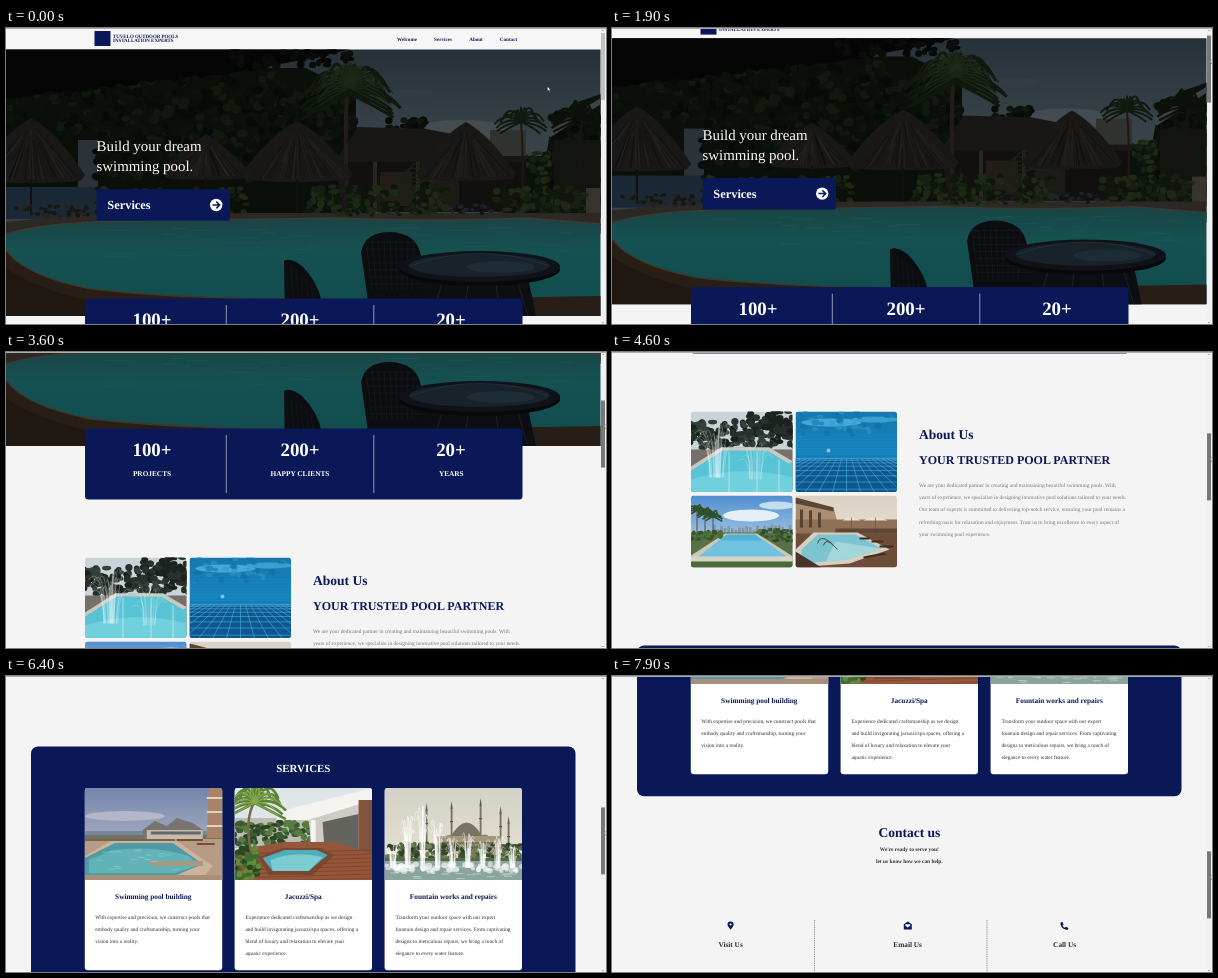
Recreate the animation shown at these times as an HTML page. Size 600 px wide and 296 px high, loop 8 s.

```html
<!DOCTYPE html>
<html lang="en">
<head>
<meta charset="utf-8">
<title>Swimming pools</title>
<style>
@property --s { syntax: '<number>'; inherits: true; initial-value: 0; }
html, body { margin: 0; width: 100%; height: 100%; overflow: hidden; background: #f4f4f4; }
#stage { position: relative; width: 600px; height: 296px; overflow: hidden; background: #f4f4f4; animation: scroll 8s infinite; }
#page { position: absolute; left: 0; top: 0; transform: translateY(calc(var(--s) * -1px)); }
text { font-family: 'Liberation Serif', 'Times New Roman', serif; text-rendering: geometricPrecision; }
.b { font-weight: bold; }
.m { text-anchor: middle; }
.navy { fill: #0a1858; }
.w { fill: #fff; }
.dark { fill: #2e2e33; }
.p { font-size: 5.41px; }
.h { font-size: 7.32px; }
#line { position: absolute; left: 0; top: 0; width: 600px; height: 1px; background: #adadad; }
#bar { position: absolute; left: 594.5px; top: 1px; width: 5.5px; height: 295px; background: #f1f1f1; }
#bar i { position: absolute; left: 1.5px; border: 1.5px solid transparent; }
#up { top: 0; border-bottom-color: #777 !important; }
#down { bottom: 0; border-top-color: #777 !important; }
#thumb { position: absolute; left: .7px; top: 4.4px; width: 4.3px; height: 66.5px; background: #c1c1c1;
  transform: translateY(calc(var(--s) * .2245px)); animation: grab 8s step-end infinite; }
#mouse { position: absolute; left: 541.2px; top: 58px; animation: reach 8s infinite; }
#mouse svg { display: block; transform: translateY(calc(var(--s) * .2245px)); }
@keyframes scroll {
  0%, 21.25% { --s: 0; animation-timing-function: steps(2); }
  23.75% { --s: 11.4; animation-timing-function: steps(17); }
  45% { --s: 194; animation-timing-function: steps(10); }
  57.5% { --s: 340; animation-timing-function: steps(8); }
  67.5% { --s: 426.5; animation-timing-function: steps(10); }
  80% { --s: 563; animation-timing-function: steps(15); }
  98.75%, 100% { --s: 759; animation-timing-function: step-end; }
}
@keyframes grab { 0% { background: #c1c1c1; } 20% { background: #a8a8a8; } 21.25%, 100% { background: #787878; } }
@keyframes reach {
  0%, 17.5% { left: 541.2px; top: 58px; animation-timing-function: steps(3); }
  21.25%, 100% { left: 597.8px; top: 27.5px; }
}
</style>
</head>
<body>
<div id="stage">
<svg id="page" width="600" height="1260" viewBox="0 0 600 1260">
  <defs>
    <clipPath id="cHero"><rect y="21.6" width="594.5" height="266.4"/></clipPath>
    <clipPath id="cTall"><rect width="101.5" height="80.5" rx="3"/></clipPath>
    <clipPath id="cWide"><rect width="101.5" height="72" rx="3"/></clipPath>
    <clipPath id="cCard"><path d="M0 92V3Q0 0 3 0H134.4Q137.4 0 137.4 3V92Z"/></clipPath>
    <linearGradient id="gSky" x2="0" y2="1"><stop stop-color="#253039"/><stop offset=".5" stop-color="#384349"/><stop offset="1" stop-color="#3a4044"/></linearGradient>
    <linearGradient id="gPool" x2="0" y2="1"><stop stop-color="#1a4443"/><stop offset=".35" stop-color="#155152"/><stop offset="1" stop-color="#114b4d"/></linearGradient>
    <linearGradient id="gDeep" x2="0" y2="1"><stop stop-color="#1678ad"/><stop offset=".5" stop-color="#1583bd"/><stop offset="1" stop-color="#0b4a80"/></linearGradient>
    <linearGradient id="gBlue" x2="0" y2="1"><stop stop-color="#4f8fd0"/><stop offset="1" stop-color="#dbe8f0"/></linearGradient>
    <linearGradient id="gDusk" x2="0" y2="1"><stop stop-color="#7486ac"/><stop offset="1" stop-color="#c7c6cd"/></linearGradient>
    <linearGradient id="gWarm" x2="0" y2="1"><stop stop-color="#d9d2c6"/><stop offset="1" stop-color="#f3e6d0"/></linearGradient>
    <linearGradient id="gHaze" x2="0" y2="1"><stop stop-color="#d4d2c6"/><stop offset="1" stop-color="#e8e3d4"/></linearGradient>
  </defs>

  <rect width="600" height="22" fill="#f6f6f6"/>
  <rect x="88.5" y="3" width="16" height="15" fill="#0a1858"/>
  <g class="b navy" font-size="4.92">
    <text x="107" y="9.8">TUVELO OUTDOOR POOLS</text><text x="107" y="14.2">INSTALLATION EXPERTS</text>
  </g>
  <g class="b navy m" font-size="5.1">
    <text x="401" y="12.8">Welcome</text><text x="437" y="12.8">Services</text>
    <text x="470" y="12.8">About</text><text x="502.5" y="12.8">Contact</text>
  </g>

  <g id="hero" clip-path="url(#cHero)"></g>
  <g class="w" font-size="14.9"><text x="90.5" y="123">Build your dream</text><text x="90.5" y="143">swimming pool.</text></g>
  <rect x="90.5" y="161.3" width="133.5" height="31.5" rx="2" fill="#0a1858"/>
  <text class="w b" x="101.3" y="181.2" font-size="12.4">Services</text>
  <circle cx="210.2" cy="177" r="6.2" fill="#fff"/>
  <path d="M206.5 177H213M210.3 173.6L213.7 177L210.3 180.4" fill="none" stroke="#0a1858" stroke-width="1.5"/>

  <rect x="79" y="270.5" width="437.5" height="71" rx="3.5" fill="#0a1858"/>
  <path d="M220.3 277V335M367.8 277V335" stroke="#b5b9cf" stroke-width=".8"/>
  <g class="w b m" font-size="18.9"><text x="146" y="298.2">100+</text><text x="294" y="298.2">200+</text><text x="445" y="298.2">20+</text></g>
  <g class="w b m h"><text x="146" y="317.6">PROJECTS</text><text x="294" y="317.6">HAPPY CLIENTS</text><text x="445.3" y="317.6">YEARS</text></g>

  <g id="spray" transform="translate(79 399.5)" clip-path="url(#cTall)"></g>
  <g id="under" transform="translate(183.5 399.5)" clip-path="url(#cTall)"></g>
  <g id="city" transform="translate(79 483.5)" clip-path="url(#cWide)"></g>
  <g id="roof" transform="translate(183.5 483.5)" clip-path="url(#cWide)"></g>
  <text class="b navy" x="307" y="426.7" font-size="13.5">About Us</text>
  <text class="b navy" x="307" y="452" font-size="12.03">YOUR TRUSTED POOL PARTNER</text>
  <text class="p" y="475" fill="#777"><tspan x="307">We are your dedicated partner in creating and maintaining beautiful swimming pools. With</tspan><tspan x="307" dy="12.2">years of experience, we specialize in designing innovative pool solutions tailored to your needs.</tspan><tspan x="307" dy="12.2">Our team of experts is committed to delivering top-notch service, ensuring your pool remains a</tspan><tspan x="307" dy="12.2">refreshing oasis for relaxation and enjoyment. Trust us to bring excellence to every aspect of</tspan><tspan x="307" dy="12.2">your swimming pool experience.</tspan></text>

  <rect x="25" y="633.5" width="544.5" height="245.7" rx="7" fill="#0a1858"/>
  <text class="w b m" x="297.3" y="659.2" font-size="10.9">SERVICES</text>
  <g fill="#fff">
    <rect x="78.8" y="675" width="137.4" height="182.2" rx="3"/><rect x="228.6" y="675" width="137.4" height="182.2" rx="3"/><rect x="378.6" y="675" width="137.4" height="182.2" rx="3"/>
  </g>
  <g id="villa" transform="translate(78.8 675)" clip-path="url(#cCard)"></g>
  <g id="spa" transform="translate(228.6 675)" clip-path="url(#cCard)"></g>
  <g id="fount" transform="translate(378.6 675)" clip-path="url(#cCard)"></g>
  <g class="b navy m h"><text x="147.3" y="785.6">Swimming pool building</text><text x="297.3" y="785.6">Jacuzzi/Spa</text><text x="447.3" y="785.6">Fountain works and repairs</text></g>
  <g class="p dark">
    <text y="805.8"><tspan x="89.3">With expertise and precision, we construct pools that</tspan><tspan x="89.3" dy="12.2">embody quality and craftsmanship, turning your</tspan><tspan x="89.3" dy="12.2">vision into a reality.</tspan></text>
    <text y="805.8"><tspan x="239.4">Experience dedicated craftsmanship as we design</tspan><tspan x="239.4" dy="12.2">and build invigorating jacuzzi/spa spaces, offering a</tspan><tspan x="239.4" dy="12.2">blend of luxury and relaxation to elevate your</tspan><tspan x="239.4" dy="12.2">aquatic experience.</tspan></text>
    <text y="805.8"><tspan x="389.4">Transform your outdoor space with our expert</tspan><tspan x="389.4" dy="12.2">fountain design and repair services. From captivating</tspan><tspan x="389.4" dy="12.2">designs to meticulous repairs, we bring a touch of</tspan><tspan x="389.4" dy="12.2">elegance to every water feature.</tspan></text>
  </g>

  <text class="b navy m" x="297.4" y="919.6" font-size="13.5">Contact us</text>
  <g class="b dark m p"><text x="297.3" y="933.6">We're ready to serve you!</text><text x="297.3" y="945.7">let us know how we can help.</text></g>
  <path d="M202.5 1003V1110M375 1003V1110" stroke="#777" stroke-width=".8" stroke-dasharray="1 .8"/>
  <g fill="#0a1858">
    <path d="M118.6 1012.8Q115.5 1009.2 115.5 1007.6A3.1 3.1 0 0 1 121.7 1007.6Q121.7 1009.2 118.6 1012.8ZM118.6 1006.4A1.1 1.1 0 1 0 118.6 1008.6A1.1 1.1 0 1 0 118.6 1006.4Z" fill-rule="evenodd"/>
    <path d="M291.8 1007.2L295.8 1004.6L299.8 1007.2V1012.4H291.8Z"/>
    <path d="M293.3 1007.3H298.3V1008.8L295.8 1010.6L293.3 1008.8Z" fill="#f4f4f4"/>
    <path d="M448.6 1005.4L450.4 1004.7L451.6 1007.4L450.5 1008.4Q451.2 1010 452.8 1010.8L453.8 1009.7L456.5 1010.9L455.8 1012.7Q454.6 1013 453.4 1012.5Q449.2 1011 448.5 1006.9Z"/>
  </g>
  <g class="b dark m h"><text x="118.6" y="1029.9">Visit Us</text><text x="295.6" y="1029.9">Email Us</text><text x="452.6" y="1029.9">Call Us</text></g>
</svg>
<div id="line"></div>
<div id="bar"><i id="up"></i><i id="down"></i><div id="thumb"></div></div>
<div id="mouse"><svg width="5" height="7" viewBox="0 0 5 7"><path d="M.4.4V5L1.5 4.1L2.2 5.7L2.9 5.4L2.3 3.8H3.7Z" fill="#fff" stroke="#111" stroke-width=".35"/></svg></div>
</div>
<script>
let seed = 7;
const rnd = (a = 0, b = 1) => {
  seed = (seed * 16807) % 2147483647;
  return a + (b - a) * seed / 2147483647;
};
const times = (n, f) => Array.from({ length: n }, (_, i) => f(i)).join('');
const fix = v => v.toFixed(1);
const area = (d, fill) => `<path d="${d}" fill="${fill}"/>`;
const line = (d, color, w = 1) => `<path d="${d}" fill="none" stroke="${color}" stroke-width="${w}"/>`;
const box = (x, y, w, h, fill) => `<rect x="${x}" y="${y}" width="${w}" height="${h}" fill="${fill}"/>`;
const oval = (x, y, rx, ry, fill) => `<ellipse cx="${fix(x)}" cy="${fix(y)}" rx="${fix(rx)}" ry="${fix(ry)}" fill="${fill}"/>`;
const leaves = (x, y, w, h, n, r, fills) => times(n, i =>
  oval(rnd(x, x + w), rnd(y, y + h), rnd(r * .5, r), rnd(r * .4, r * .8), fills[i % fills.length]));
const palm = (x, y, r, n, color, w = 1) => line(times(n, i => {
  const a = Math.PI * (1.15 - 1.3 * i / (n - 1)), c = Math.cos(a), s = Math.sin(a), k = rnd(.75, 1.1) * r;
  return `M${x} ${y}Q${fix(x + c * k * .6)} ${fix(y - s * k * .9 - r * .15)} ${fix(x + c * k)} ${fix(y - s * k * .5 + r * .25)}`;
}), color, w);
const jets = (x, y, h, spread, n, color, w) => line(times(n, () => {
  const dx = rnd(-spread, spread), k = rnd(.5, 1) * h;
  return `M${fix(x + dx * .3)} ${y}Q${fix(x + dx * .4)} ${fix(y - k)} ${fix(x + dx)} ${fix(y - k * .7)}`;
}), color, w);
const hut = (x, top, half, base) =>
  area(`M${x} ${top}Q${x + half * .45} ${top + 12} ${x + half} ${base - 6}L${x + half - 4} ${base}Q${x} ${base + 4} ${x - half + 4} ${base}L${x - half} ${base - 6}Q${x - half * .45} ${top + 12} ${x} ${top}Z`, '#191817') +
  ['#2b2926', '#0e0e0d'].map(c => line(times(30, () => {
    const u = rnd(-1, 1), v = rnd(.1, .7);
    return `M${fix(x + u * half * v)} ${fix(top + 4 + (base - top) * v)}L${fix(x + u * half * .93)} ${base - 2}`;
  }), c, .5)).join('') + box(x - 1, base, 2, 32, '#12100e');
const draw = (id, ...parts) => document.getElementById(id).innerHTML = parts.join('');

const night = ['#070b08', '#0c120b', '#11190f', '#090e09'];
const bush = ['#0f170d', '#161f11', '#1d2815'];
draw('hero',
  box(0, 21, 595, 182, 'url(#gSky)'),
  oval(455, 102, 48, 10, '#434c51'), oval(395, 66, 34, 5, '#313c44'),
  area('M0 40H300L350 66V190H0Z', '#0a0f0a'), box(72, 112, 20, 48, '#2b3338'), box(0, 159, 92, 32, '#1a2935'),
  area('M545 100L566 76L595 66V190H500V128H540Z', '#0c110c'),
  leaves(0, 42, 88, 62, 110, 5, night), leaves(90, 46, 190, 106, 380, 6, night), leaves(265, 62, 85, 85, 150, 6, night),
  leaves(382, 92, 38, 14, 34, 5, night), leaves(545, 84, 50, 90, 110, 6, night), leaves(484, 125, 60, 30, 50, 5, bush),
  area('M330 132L352 99L420 101L520 120V184H335Z', '#181715'),
  box(340, 134, 180, 50, '#11100f'), box(374, 144, 32, 34, '#221d18'), box(425, 144, 28, 36, '#1c1916'),
  box(367, 134, 4, 50, '#2a2622'), box(410, 134, 4, 50, '#2a2622'), box(484, 102, 36, 26, '#30322f'),
  area('M538 104L595 70V76L545 109Z', '#3d4347'), box(548, 112, 47, 70, '#12140f'), box(580, 160, 15, 26, '#373430'),
  palm(515, 94, 26, 17, '#121a10', 2), line('M515 94Q518 130 516 176', '#1c1813', 2),
  palm(574, 90, 28, 17, '#0c120b', 2.4), line('M576 92Q572 130 576 180', '#17130f', 3),
  line('M341 62Q338 120 342 184', '#221d18', 4), palm(344, 66, 50, 31, '#10170d', 3), palm(344, 60, 40, 25, '#1b2415', 1.2), palm(345, 52, 28, 21, '#222b19', .8),
  palm(420, 152, 34, 15, '#192113', 1.4),
  leaves(90, 160, 150, 25, 130, 4, bush), leaves(300, 158, 90, 30, 110, 5, bush), leaves(405, 158, 35, 25, 40, 5, bush), leaves(490, 160, 90, 26, 100, 5, bush),
  hut(25, 90, 54, 153), hut(200, 106, 44, 150), hut(291, 93, 56, 152), hut(460, 94, 50, 151),
  area('M0 194L60 188L240 185L595 185V206H0Z', '#2c2823'),
  leaves(10, 178, 76, 11, 40, 3, ['#1a1612', '#28211b', '#151a10']), leaves(330, 181, 110, 6, 40, 3, bush), leaves(440, 177, 50, 9, 24, 3, ['#12151a', '#1e232a']),
  area('M0 206Q40 194 120 193L330 190Q420 194 520 190L595 196V288H120Q20 262 0 226Z', 'url(#gPool)'),
  line('M0 206Q40 194 120 193L330 190Q420 194 520 190L595 196', '#3d3b35', 1.3),
  line(times(40, () => `M${fix(rnd(60, 560))} ${fix(rnd(198, 230))}h${fix(rnd(8, 30))}`), '#1c5b5b', .5),
  area('M0 222Q18 248 85 261Q180 272 350 272L595 268V288H0Z', '#281e16'), line('M0 222Q18 248 85 261Q180 272 350 272', '#443526', 1.3),
  area('M0 240Q40 268 120 279V288H0Z', '#1f1711'),
  area('M278 233Q284 229 296 238Q311 253 316 274V288H279Z', '#0c0d10'),
  line(times(6, i => `M${280 + i * 5} ${235 + i * 4}L${283 + i * 5} 280`), '#181a1e', .6),
  area('M355 224Q359 204 384 204Q411 205 415 228L424 250V288H364Z', '#0c0d10'),
  line(times(9, i => `M${360 + i * 6} ${212 + i % 2}L${366 + i * 5} 262`) + times(7, i => `M${359 + i} ${214 + i * 7}h${50 + i}`), '#1b1d22', .6),
  area('M420 250H522L530 288H415Z', '#0d0e12'), line('M436 255L426 288M462 256L458 288M490 256L494 288M512 255L522 288', '#1d2026', 1),
  oval(473.5, 241.5, 80.5, 16.5, '#07080a'), oval(473.5, 238.5, 80.5, 15.5, '#111217'), oval(473.5, 237.5, 70, 11.5, '#17222b'),
  oval(495, 239, 34, 6, '#1d2c36'), line('M404 238Q440 225 474 225.5Q510 225.5 543 238', '#2a3740', .7),
  area('M0 21H345Q300 32 262 38' + times(52, i => `L${fix(260 - i * 5)} ${fix(38 + i * .58 + rnd(0, 5))}`) + 'L0 70Z', '#050505'),
  leaves(225, 22, 120, 16, 60, 5, ['#060706', '#0a0d09']));

draw('spray',
  box(0, 0, 102, 81, '#c9d3da'), leaves(-4, 10, 110, 26, 140, 5, ['#1a211d', '#28302a', '#35403a']), leaves(58, 0, 44, 24, 60, 5, ['#1c221e', '#2a302b']),
  box(0, 38, 102, 43, '#77706a'), area('M30 36H78L102 50V76L92 81H0V57Z', '#58c3d4'), area('M30 36H78L102 50L98 52L76 39H32L0 59V55Z', '#cbc8c0'),
  area('M0 68Q50 52 102 66V81H0Z', '#70d0dd'), jets(26, 66, 75, 24, 28, '#ffffff90', .45), jets(64, 68, 52, 20, 16, '#ffffff70', .4),
  line('M38 40V81M66 40V81M88 48V81', '#e8f4f5', .6));

draw('under',
  box(0, 0, 102, 81, 'url(#gDeep)'), oval(36, 11, 30, 4, '#45a8d6'), oval(80, 8, 24, 3, '#3aa0d0'),
  leaves(0, 0, 102, 24, 34, 4, ['#3299cc80', '#0e6aa680']), box(0, 47, 102, 34, '#0d5791'),
  line(times(27, i => `M${51 + (i - 13) * 5} 47L${51 + (i - 13) * 14} 81`) + times(9, i => `M0 ${fix(47 + i * i * .48)}H102`), '#4fb4dc', .55),
  line(times(9, i => `M0 ${22 + i * 3}H102`), '#2b8fc4', .25), oval(33, 39, 2, 2, '#7cc6e3'));

draw('city',
  box(0, 0, 102, 72, 'url(#gBlue)'), oval(60, 20, 28, 6, '#e6eff5'), oval(86, 10, 18, 4, '#c4dcef'),
  times(22, i => box(fix(22 + i * 3.6), fix(36 - rnd(1, 7)), 2.6, 9, '#8295a3')), box(0, 37, 102, 35, '#587043'),
  leaves(66, 34, 38, 12, 50, 3, ['#3b5730', '#557442', '#2e4727']), area('M34 38H66L102 61V72H0V60Z', '#c9c8bd'), area('M36 39H64L95 61H8Z', '#53b3d6'), area('M29 45H73L95 61H8Z', '#6fc3df'),
  box(0, 61, 102, 5, '#d8d4c6'), box(0, 66, 102, 6, '#4b6a3b'),
  times(3, i => line(`M${6 + i * 8} ${15 + i * 3}V42`, '#5b4a34', 1) + palm(6 + i * 8, 15 + i * 3, 10, 11, '#2d5126', 1.5)), leaves(0, 36, 30, 8, 30, 3, ['#35552c', '#4a6c36']));

const shade = (x, y, r) => area(`M${x - r} ${y}Q${x} ${y - 7} ${x + r} ${y}Z`, '#e9dfcd') + line(`M${x} ${y - 3}V${y + 18}`, '#6b5443', .7);
draw('roof',
  box(0, 0, 102, 72, 'url(#gWarm)'), area('M0 2L38 12L44 34H0Z', '#a98e70'), area('M0 2L38 12V16L0 8Z', '#5c4633'), box(0, 24, 102, 16, '#8f7157'),
  line('M6 14V32M15 15V32M24 17V32', '#5a4331', 3), shade(56, 25, 9), shade(80, 25, 12), box(40, 33, 62, 5, '#5e4736'),
  box(0, 38, 102, 34, '#6d4c39'), area('M18 37H62L94 54L54 68L0 72V54Z', '#d8cfc0'), area('M22 39H60L86 53L52 64L6 68V54Z', '#7cc4cf'), area('M40 46L86 53L52 64L30 66Z', '#a2d6da'),
  area('M0 56L26 72H0Z', '#4a3529'), line('M22 48Q24 39 34 46L42 54M28 50Q30 42 38 50', '#4e4b49', 1), line('M64 43H74M76 46H88M84 51H98M68 62L90 58', '#3f2b20', 2));

draw('villa',
  box(0, 0, 138, 92, 'url(#gDusk)'), oval(40, 28, 40, 5, '#b4b7c8'), box(0, 43, 138, 6, '#77869a'), box(0, 47, 138, 8, '#70735f'),
  area('M58 42L70 33L82 38L92 30L108 35L118 42V50H58Z', '#78746f'), box(62, 42, 56, 9, '#c7bbab'), line('M66 45H116', '#63676e', 3),
  area('M124 0H138V50H122Z', '#a98368'), line('M122 10H138M122 24H138M122 38H138', '#e2d3c1', 2), box(0, 51, 138, 41, '#b69c84'), line('M0 52H90', '#63503f', 1.5),
  area('M26 53H92L128 78L116 92H0V68Z', '#cbb49b'), area('M30 55H88L118 76L92 87H0V70Z', '#4e9ba5'), area('M28 62Q70 57 104 68L114 77L90 85H4V72Z', '#62b3b8'),
  line('M92 52H104M104 52H118M112 56H130', '#7a4b39', 2.2), area('M62 73H118V78H68Z', '#a99984'), line(times(18, () => `M${fix(rnd(10, 90))} ${fix(rnd(60, 82))}h6`), '#9ad0cf', .5), box(0, 87, 138, 5, '#a78f78'));

draw('spa',
  box(0, 0, 138, 92, '#dfe6e8'), box(0, 30, 80, 30, '#b9bdb4'), leaves(0, 34, 84, 22, 120, 4, ['#3d5b30', '#587b3f', '#2c4526']),
  area('M42 24L138 0V12L74 32H42Z', '#f4f3f0'), area('M74 32L138 12V70H78Z', '#cfccc5'), area('M88 34L124 26V64H90Z', '#64645f'), box(124, 12, 14, 66, '#81533d'), box(76, 32, 5, 34, '#f6f5f2'),
  area('M0 62L50 54H100L138 66V92H0Z', '#96563a'), line(times(10, i => `M0 ${66 + i * 4}L138 ${62 + i * 4}`), '#713b27', .6),
  area('M24 69L48 60H86L100 67L78 87H34Z', '#7a4730'), area('M28 70L50 62H82L93 67L74 83H38Z', '#52adba'), area('M36 72Q60 63 88 69L74 83H38Z', '#7accd0'),
  leaves(0, 58, 24, 34, 70, 4, ['#3e6a2e', '#5f8b3d', '#28491f']), line('M16 62Q10 30 20 14', '#7b684c', 2.5),
  palm(20, 15, 33, 17, '#598536', 2.6), palm(20, 15, 26, 12, '#87a84d', 1.2));

const spire = (x, y) => box(x - .9, y, 1.8, 62 - y, '#77705e') + area(`M${x - 1.2} ${y}L${x} ${y - 8}L${x + 1.2} ${y}Z`, '#625e51') + box(x - 1.6, y + 12, 3.2, 1.2, '#5c5749');
draw('fount',
  box(0, 0, 138, 92, 'url(#gHaze)'), times(5, i => spire([42, 67, 96, 116, 124][i], [23, 21, 18, 26, 36][i])),
  area('M66 49Q82 20 98 49Z', '#787465'), area('M55 56Q65 38 74 56ZM90 56Q100 37 110 56Z', '#878170'), box(52, 48, 64, 18, '#a3967b'),
  line('M56 55H114M56 60H114', '#70664f', 1.5), leaves(0, 56, 138, 14, 160, 4, ['#3f512f', '#596b40', '#2f4026', '#75805a']),
  box(0, 71, 138, 21, '#8aa49e'), box(0, 70, 138, 3, '#59664a'), line(times(30, () => `M${fix(rnd(0, 130))} ${fix(rnd(74, 91))}h8`), '#c2d1cc', .8),
  times(9, i => jets(8 + i * 15, 80, [34, 68, 82, 66, 40, 46, 38, 42, 30][i], 8, 20, '#ffffffa0', .7)), leaves(0, 76, 138, 7, 60, 4, ['#ffffffa0', '#eef3f1a0']));
</script>
</body>
</html>
```
